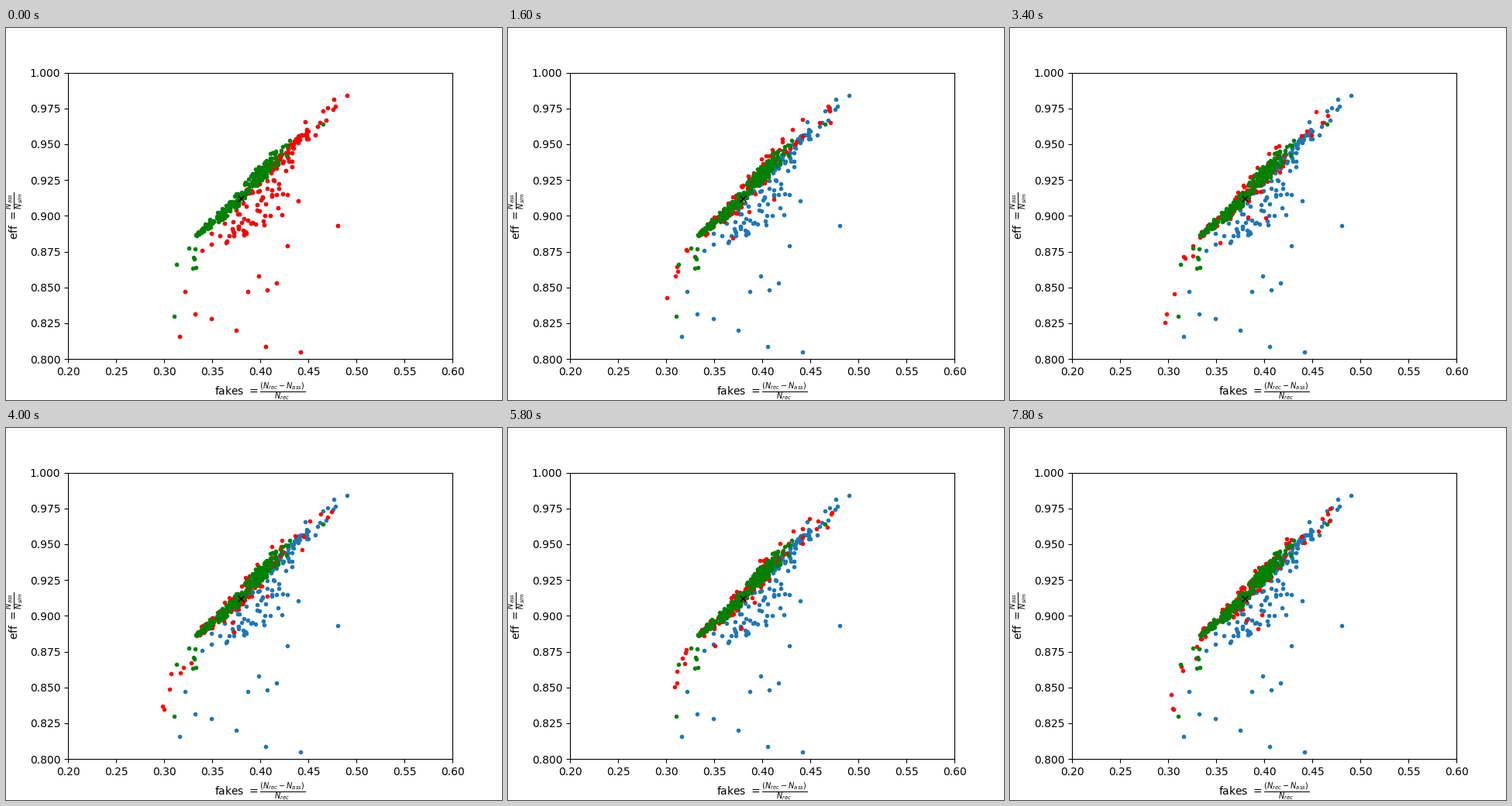
These frames come from a looping animation (640 by 480 pixels, 8 s). A matplotlib script:

```python
import numpy as np
import matplotlib.pyplot as plt
from matplotlib.animation import FuncAnimation

STEPS, STEP_MS = 40, 200

# Key points of the curve the clouds gather along
RIDGE_X = [0.33, 0.37, 0.40, 0.44, 0.49]
RIDGE_Y = [0.884, 0.907, 0.930, 0.956, 0.984]

# Lone points of the starting cloud, far from the ridge
LONERS = [
    (0.490, 0.984), (0.481, 0.893), (0.442, 0.805), (0.406, 0.809),
    (0.375, 0.820), (0.349, 0.828), (0.332, 0.8315), (0.316, 0.816),
    (0.322, 0.847), (0.387, 0.847), (0.407, 0.848), (0.417, 0.853),
    (0.398, 0.858), (0.428, 0.879),
]
BEST_LONERS = [(0.3105, 0.830), (0.313, 0.866), (0.465, 0.964)]


def ridge(x):
    return np.interp(x, RIDGE_X, RIDGE_Y)


def points(x, y):
    return np.column_stack([x, y])


def core(rng, left, right, spread=1):
    """Thin even band on the left, thicker cluster around the middle."""
    x = np.append(rng.uniform(0.333, 0.378, left),
                  np.clip(rng.normal(0.394, 0.018, right), 0.335, 0.442))
    sigma = spread * np.interp(x, [0.333, 0.40], [0.0010, 0.0034])
    return points(x, ridge(x) + sigma * np.clip(rng.normal(size=x.size), -2, 2))


def halo(rng, n):
    """Loose points under the ridge, reaching deeper to the right."""
    x = rng.triangular(0.335, 0.385, 0.445, n)
    depth = (0.012 + 0.4 * (x - 0.335)) * rng.uniform(0.35, 1, n)
    return points(x, ridge(x) - depth)


def tail(rng, n):
    """Steep drop at the lower left end of the ridge."""
    x = rng.uniform(0.296, 0.331, n)
    y = 0.882 - 40 * (0.331 - x) ** 2 - rng.exponential(0.007, n)
    return points(x, np.maximum(y, 0.806))


def top(rng, n, low, high):
    x = rng.uniform(low, high, n)
    return points(x, ridge(x) + rng.normal(-0.003, 0.005, n))


def start_cloud():
    rng = np.random.default_rng(4)
    x = np.clip(rng.normal(0.414, 0.019, 110), 0.375, 0.448)
    under = points(x, ridge(x) - rng.exponential(0.005, x.size))
    return np.vstack([LONERS, under, halo(rng, 45), top(rng, 16, 0.435, 0.48)])


def best_cloud():
    rng = np.random.default_rng(9)
    end = points(rng.uniform(0.323, 0.334, 6), rng.uniform(0.863, 0.879, 6))
    return np.vstack([BEST_LONERS, end, core(rng, 90, 140)])


def swarm(step):
    if step == 0:
        return START
    rng = np.random.default_rng(100 + step)
    return np.vstack([core(rng, 45, 75, 1.5), halo(rng, 3), tail(rng, 7),
                      top(rng, 6, 0.43, 0.475)])


START = start_cloud()

plt.rcParams["text.kerning_factor"] = 6
fig, ax = plt.subplots(figsize=(6.4, 4.8), dpi=100)
ax.set(xlim=(0.2, 0.6), ylim=(0.8, 1.0))
ax.set_xlabel(r"fakes $=\frac{(N_{rec} - N_{ass})}{N_{rec}}$")
ax.set_ylabel(r"eff $=\frac{N_{ass}}{N_{sim}}$")

dot = dict(marker=".", linestyle="none", markersize=6, markeredgewidth=1)
ax.plot(*START.T, color="tab:blue", **dot)
current, = ax.plot([], [], color="red", **dot)
ax.plot(*best_cloud().T, color="green", **dot)
ax.plot(0.38, 0.912, "x", color="black", markersize=6, markeredgewidth=1)


def update(step):
    current.set_data(*swarm(step).T)
    return current,


anim = FuncAnimation(fig, update, frames=STEPS, interval=STEP_MS,
                     init_func=lambda: update(0), repeat=True, repeat_delay=0)
plt.show()
```
